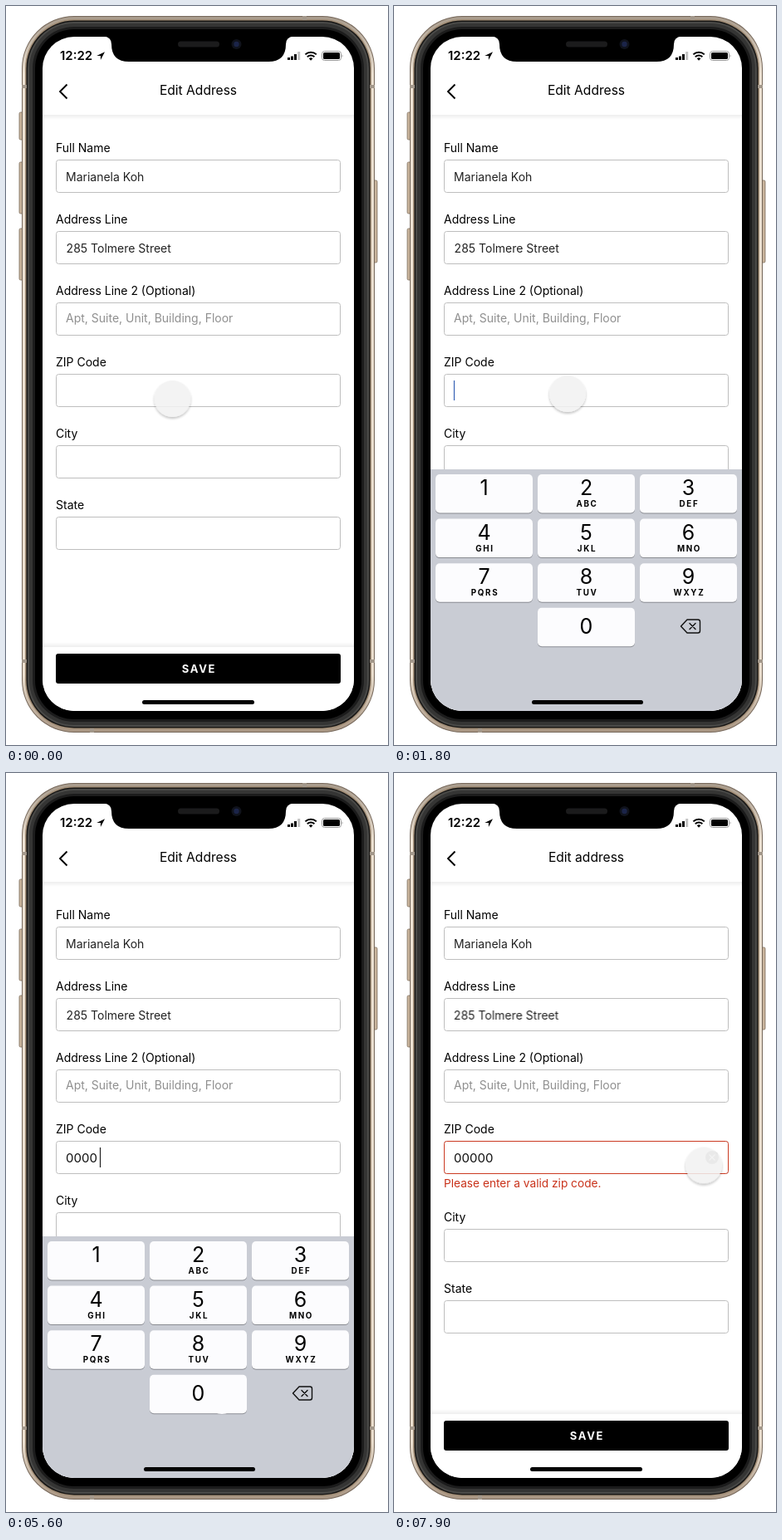
Animation of 460x890 px, one loop 8000 ms. Source, as an HTML page:

```html
<!DOCTYPE html>
<html lang="en">
<head>
<meta charset="utf-8">
<title>Edit Address</title>
<style>
html, body { margin: 0; width: 100%; height: 100%; overflow: hidden; background: #fff; }
svg { display: block; width: 460px; height: 890px; font: 14px Inter, Roboto, sans-serif; }
.mid { text-anchor: middle; }
.title { font-size: 15.6px; }
.box { fill: #fff; stroke: #bebebe; }
.key { fill: #fcfcfe; }
.edge { fill: #8a8c92; }
.digit { font-size: 25px; }
.abc { font-size: 9.8px; font-weight: 700; letter-spacing: 1.7px; }

/* hard switches */
.before, .after, .shift, .line, .caret, .zip tspan {
  animation: 8s step-end infinite;
}
.before { animation-name: before; }
.after { animation-name: after; }
.shift { animation-name: shift; }
.line { animation-name: line; }
.caret { animation-name: caret; }
.zip tspan:nth-child(1) { animation-name: d1; }
.zip tspan:nth-child(2) { animation-name: d2; }
.zip tspan:nth-child(3) { animation-name: d3; }
.zip tspan:nth-child(4) { animation-name: d4; }
.zip tspan:nth-child(5) { animation-name: d5; }
@keyframes before { 0% { opacity: 1 } 76.875%, 100% { opacity: 0 } }
@keyframes after { 0% { opacity: 0 } 76.875%, 100% { opacity: 1 } }
@keyframes shift { 0% { transform: none } 76.875%, 100% { transform: translateY(20px) } }
@keyframes line { 0% { transform: translateX(.6px) } 76.875%, 100% { transform: none } }
@keyframes d1 { 0% { fill-opacity: 0 } 53.75%, 100% { fill-opacity: 1 } }
@keyframes d2 { 0% { fill-opacity: 0 } 57.5%, 100% { fill-opacity: 1 } }
@keyframes d3 { 0% { fill-opacity: 0 } 61.25%, 100% { fill-opacity: 1 } }
@keyframes d4 { 0% { fill-opacity: 0 } 65%, 100% { fill-opacity: 1 } }
@keyframes d5 { 0% { fill-opacity: 0 } 71.25%, 100% { fill-opacity: 1 } }
@keyframes caret {
  0% { opacity: 0; transform: none; stroke: #3762b4 }
  20% { opacity: 1; transform: none; stroke: #3762b4 }
  53.75% { opacity: 1; transform: translateX(13px); stroke: #222 }
  57.5% { opacity: 1; transform: translateX(22px); stroke: #222 }
  61.25% { opacity: 1; transform: translateX(32px); stroke: #222 }
  65% { opacity: 1; transform: translateX(41px); stroke: #222 }
  71.25% { opacity: 1; transform: translateX(50px); stroke: #222 }
  75%, 100% { opacity: 0; transform: translateX(50px); stroke: #222 }
}

/* smooth motion */
.pad { animation: pad 8s infinite; }
@keyframes pad {
  0%, 18.75% { transform: translateY(292px); animation-timing-function: ease-out }
  21.875%, 73.125% { transform: none; animation-timing-function: ease-in-out }
  76.875%, 100% { transform: translateY(292px) }
}
.touch { animation: move 8s ease-in-out infinite; }
@keyframes move {
  0%, 2.5% { transform: translate(200.5px, 473px) }
  7.5%, 32.5% { transform: translate(209px, 467px) }
  42.5%, 73.125% { transform: translate(260px, 750px) }
  76.25%, 81.25% { transform: translate(260px, 752.5px) }
  92.5%, 100% { transform: translate(373px, 472.5px) }
}
.dot { animation: dot 8s linear infinite; }
@keyframes dot {
  0%, 42.5% { opacity: 1 }
  45%, 74% { opacity: 0 }
  77%, 100% { opacity: 1 }
}
.press { animation: press 8s linear infinite; }
@keyframes press {
  0%, 42.5% { opacity: 0 }
  45%, 73.125% { opacity: 1 }
  74%, 100% { opacity: 0 }
}
</style>
</head>
<body>
<svg viewBox="0 0 460 890">
  <defs>
    <clipPath id="screen"><rect x="44" y="37" width="375" height="812" rx="38"/></clipPath>
    <linearGradient id="fade" x2="0" y2="1">
      <stop stop-color="#000" stop-opacity=".07"/><stop offset="1" stop-color="#000" stop-opacity="0"/>
    </linearGradient>
    <linearGradient id="gold" x2="0" y2="1">
      <stop stop-color="#a89b8c"/><stop offset=".08" stop-color="#ede2d3"/>
      <stop offset=".92" stop-color="#ebdfcf"/><stop offset="1" stop-color="#a99683"/>
    </linearGradient>
    <filter id="soft" x="-30%" y="-30%" width="160%" height="170%">
      <feDropShadow dx="0" dy="2" stdDeviation="1.6" flood-opacity=".28"/>
    </filter>
  </defs>

  <g fill="#c9b49c" stroke="#7d6c5b" stroke-width=".8">
    <rect x="16" y="128" width="6" height="33" rx="1.5"/>
    <rect x="16" y="188" width="6" height="62" rx="1.5"/>
    <rect x="16" y="268" width="6" height="62" rx="1.5"/>
    <rect x="441" y="210" width="6" height="99" rx="1.5"/>
  </g>
  <g id="bezel"></g>
  <g fill="#a3988b">
    <path d="M19 95h6v4h-6zM438 95h6v4h-6zM19 787h6v4h-6zM438 787h6v4h-6zM357 12h5v5h-5zM101 870h5v5h-5z"/>
  </g>

  <g clip-path="url(#screen)">
    <rect x="44" y="37" width="375" height="812" fill="#fff"/>
    <rect x="44" y="131" width="375" height="6" fill="url(#fade)"/>

    <g fill="#000">
      <text x="65" y="65" font-size="15" font-weight="600">12:22</text>
      <path d="M119 55.2 109.2 60h4.7v5z"/>
      <path d="M339 62h3v3h-3zM343 60.5h3v4.5h-3zM347 58h3v7h-3z"/>
      <path d="M351.2 55h3v10h-3z" fill="#c4c4c4"/>
      <g fill="none" stroke="#000" stroke-width="2">
        <path d="M360.4 58.4a9.6 9.6 0 0 1 13.4 0M362.8 61.2a6.3 6.3 0 0 1 8.600 0"/>
      </g>
      <path d="M364.800 63.300a3.300 3.300 0 0 1 4.600 0l-2.300 2.500z"/>
      <rect x="380.500" y="54.500" width="23" height="11" rx="3" fill="none" stroke="#999"/>
      <rect x="382" y="56" width="20" height="8" rx="1.600"/>
      <path d="M404.700 58.200q1.800 1.800 0 3.700z" fill="#888"/>
    </g>
    <path d="M73.500 94.500 65 103l8.500 8.500" fill="none" stroke="#000" stroke-width="1.900"/>
    <g class="title mid">
      <text class="before" x="231.500" y="107">Edit Address</text>
      <text class="after" x="231.500" y="107">Edit address</text>
    </g>

    <g id="fields"></g>
    <g class="shift" id="lower"></g>

    <text x="72" y="211" fill="#222">Marianela Koh</text>
    <text class="line" x="72" y="297" fill="#222">285 Tolmere Street</text>
    <text x="72" y="381" fill="#8f8f8f">Apt, Suite, Unit, Building, Floor</text>
    <g class="after">
      <rect class="box" x="60.500" y="443.500" width="342" height="39" rx="3" style="stroke:#cb3a22"/>
      <text x="60" y="499" font-size="13.700" fill="#c9321a">Please enter a valid zip code.</text>
      <circle cx="383" cy="463" r="8" fill="#b8b8b8"/>
      <path d="M379.500 459.500l7 7m0-7l-7 7" stroke="#fff" stroke-width="1.100"/>
    </g>
    <text class="zip" x="72" y="469" font-size="15" fill="#111"><tspan>0</tspan><tspan>0</tspan><tspan>0</tspan><tspan>0</tspan><tspan>0</tspan></text>
    <path class="caret" d="M72.500 451v24" stroke-width="1.200"/>

    <rect x="44" y="769" width="375" height="80" fill="#fff"/>
    <rect x="44" y="766" width="375" height="6" fill="url(#fade)" transform="matrix(1 0 0 -1 0 1538)"/>
    <rect x="60" y="780" width="343" height="36" rx="3"/>
    <text class="mid" x="232.500" y="802.500" font-size="13" font-weight="700" letter-spacing="1.700" fill="#fff">SAVE</text>
    <rect x="164" y="836" width="135" height="5" rx="2.500"/>

    <g class="pad">
      <rect x="44" y="558" width="375" height="292" fill="#c9ccd4"/>
      <g id="keys"></g>
      <g fill="none" stroke="#111" stroke-width="1.400" stroke-linejoin="round" stroke-linecap="round">
        <path d="M345.500 747l7.500-8h13q2.500 0 2.500 2.500v11q0 2.500-2.500 2.500h-13z"/>
        <path d="M356 743.500l7 7m0-7l-7 7"/>
      </g>
      <rect x="166" y="836" width="134" height="5" rx="2.500"/>
    </g>

    <g class="touch">
      <circle class="press" r="22" fill="#fcfcfe"/>
      <g class="dot"><circle r="22" fill="#f2f2f2" opacity=".86" filter="url(#soft)"/></g>
    </g>
  </g>

  <path d="M118 36.500q9 1 9 9.500 0 21 21 21H316q21 0 21-21 0-8.500 9-9.500z"/>
  <rect x="207" y="42.500" width="50" height="7" rx="3.500" fill="#1b1b1c"/>
  <circle cx="277.500" cy="46" r="6" fill="#10131c"/>
  <circle cx="277.500" cy="46" r="3.200" fill="#1b2449"/>
</svg>
<script>
const fill = (id, html) => { document.getElementById(id).innerHTML = html; };

const ring = ([inset, color]) =>
  `<rect x="${19 + inset}" y="${12 + inset}" width="${425 - 2 * inset}" height="${863 - 2 * inset}" rx="${63 - inset}" fill="${color}"/>`;
fill('bezel', [
  [0, '#75675a'], [1, 'url(#gold)'], [4, '#a18d76'], [5.5, '#171615'],
  [7, '#4a4a48'], [9, '#353534'], [13, '#1c1c1c'], [16, '#000']
].map(ring).join(''));

const field = (label, y) =>
  `<text x="60" y="${y}">${label}</text>
   <rect class="box" x="60.5" y="${y + 9.5}" width="342" height="39" rx="3"/>`;
fill('fields', ['Full Name', 'Address Line', 'Address Line 2 (Optional)', 'ZIP Code']
  .map((label, i) => field(label, 176 + 86 * i)).join(''));
fill('lower', field('City', 520) + field('State', 606));

const letters = ['', 'ABC', 'DEF', 'GHI', 'JKL', 'MNO', 'PQRS', 'TUV', 'WXYZ'];
const key = (digit, abc, col, row) => {
  const x = 50 + 123 * col, y = 564 + 53.6 * row, mid = x + 58.5;
  const base = y + (row === 3 ? 31.5 : 25.2);
  return `<rect class="edge" x="${x}" y="${y + 1}" width="117" height="46.5" rx="5"/>
    <rect class="key" x="${x}" y="${y}" width="117" height="46.5" rx="5"/>
    <text class="digit mid" x="${mid}" y="${base}">${digit}</text>
    <text class="abc mid" x="${mid + 1}" y="${y + 39.2}">${abc}</text>`;
};
fill('keys', letters.map((abc, i) => key(i + 1, abc, i % 3, Math.floor(i / 3))).join('') + key(0, '', 1, 3));
</script>
</body>
</html>
```
